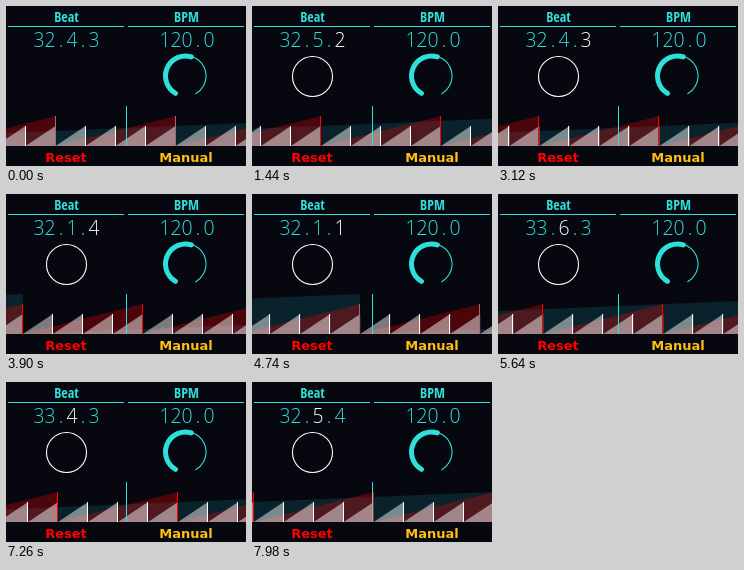
Animation of 240x160 px, one loop 8000 ms. Source, as an HTML page with a canvas:

```html
<!DOCTYPE html>
<html lang="en">
<head>
<meta charset="utf-8">
<title>Metronome display</title>
<style>
html, body { margin: 0; width: 100%; height: 100%; overflow: hidden; background: #06070f; }
canvas { display: block; width: 240px; height: 160px; }
</style>
</head>
<body>
<canvas id="stage" width="240" height="160"></canvas>
<script>
const ctx = document.getElementById('stage').getContext('2d');
const CYAN = '#2ee0dc', WHITE = '#fff', RED = '#f00', AMBER = '#ffc010';
const BACK = '#06070f', MUTED = '#a06a74';
const HEAD_FONT = 'bold condensed 14px "Open Sans Condensed", "Roboto Condensed", "Open Sans", sans-serif';
const DIGIT_FONT = '300 19.4px "Open Sans", "Noto Sans", sans-serif';
const BUTTON_FONT = 'bold 13px "DejaVu Sans", sans-serif';
const LOOP = 8000, STEP = 60, CELL = 11;
const BEAT_W = 30, NOW_X = 120, FLOOR = 140;
const START_BEAT = 14.35, BEATS_PER_STEP = 0.1398;
const TOUCH_STEP = 16, BAR_STEP = 84;

// Knob turns as [step, total shift in beats]
const TURNS = [[0, 0], [24, 0], [34, 10], [39, 10], [52, -7], [70, -25],
               [86, -25], [94, 27], [101, 63], [113, 63], [126, -13], [134, -13]];

function shiftAt(step) {
  const i = TURNS.findIndex(([s]) => s > step);
  const [s0, v0] = TURNS[i - 1], [s1, v1] = TURNS[i];
  const turn = (v1 - v0) * (step - s0) / (s1 - s0);
  const grain = step < BAR_STEP ? 1 : 4;
  return v0 + Math.round(turn / grain) * grain;
}

function rect(x, y, w, h, color) {
  ctx.fillStyle = color;
  ctx.fillRect(x, y, w, h);
}

function arc(x, y, r, from, to, width, color) {
  ctx.beginPath();
  ctx.arc(x, y, r, from * Math.PI / 180, to * Math.PI / 180);
  ctx.lineWidth = width;
  ctx.lineCap = 'round';
  ctx.strokeStyle = color;
  ctx.stroke();
}

function label(text, x, y, font, color) {
  ctx.font = font;
  ctx.textAlign = 'center';
  ctx.fillStyle = color;
  ctx.fillText(text, x, y);
}

// One character per cell, so the digits keep a fixed pitch
function digits(text, x, colorAt) {
  [...text].forEach((c, i) => label(c, x + (i + 0.5) * CELL, 41, DIGIT_FONT, colorAt(i)));
}

function saw(beat, beats, height, color) {
  const width = beats * BEAT_W;
  const phase = ((beat % beats) + beats) % beats;
  let x = NOW_X - phase * BEAT_W;
  while (x > 0) x -= width;
  ctx.fillStyle = color;
  for (; x < 240; x += width) {
    ctx.beginPath();
    ctx.moveTo(x, FLOOR);
    ctx.lineTo(x + width, FLOOR);
    ctx.lineTo(x + width, FLOOR - height);
    ctx.fill();
  }
}

function graph(beat, touched) {
  saw(beat, 32, 40, 'rgba(30,190,200,0.15)');
  saw(beat, 4, 30, 'rgba(255,0,0,0.28)');
  saw(beat, 1, 20, 'rgba(255,255,255,0.47)');
  rect(NOW_X, 100, 1, 40, CYAN);

  const whole = Math.floor(beat);
  const barColor = touched && whole % 4 ? RED : MUTED;
  for (let n = whole - 4; n <= whole + 5; n++) {
    const x = Math.round(NOW_X - (beat - n) * BEAT_W) - 1;
    if (n % 4) rect(x, FLOOR - 20, 1, 20, WHITE);
    else rect(x, FLOOR - 30, 1, 30, barColor);
  }
}

function counter(beat, selected) {
  const whole = Math.floor(beat);
  const parts = [32 + Math.floor(whole / 32), Math.floor(whole / 4) % 8 + 1, whole % 4 + 1];
  const marked = [0, 3, 5][selected];
  digits(parts.join('.'), 27.5, i => i === marked ? WHITE : CYAN);
  digits('120.0', 153.5, () => CYAN);
}

function draw(step) {
  const beat = START_BEAT + step * BEATS_PER_STEP + shiftAt(step);
  const touched = step >= TOUCH_STEP;
  const selected = !touched ? -1 : step < BAR_STEP ? 2 : 1;

  rect(0, 0, 240, 160, BACK);

  label('Beat', 60.5, 16, HEAD_FONT, CYAN);
  label('BPM', 180.5, 16, HEAD_FONT, CYAN);
  rect(2, 20, 116, 1, CYAN);
  rect(122, 20, 116, 1, CYAN);

  counter(beat, selected);
  if (touched) arc(60.5, 70.5, 20, 0, 360, 1.1, WHITE);
  arc(179.5, 70, 20.5, 120, 420, 1.1, CYAN);
  arc(179.5, 70, 20, 120, 287, 5, CYAN);

  graph(beat, touched);
  label('Reset', 60, 156, BUTTON_FONT, RED);
  label('Manual', 180, 156, BUTTON_FONT, AMBER);
}

function tick() {
  draw(Math.floor((performance.now() % LOOP) / STEP));
  requestAnimationFrame(tick);
}
tick();
</script>
</body>
</html>
```
